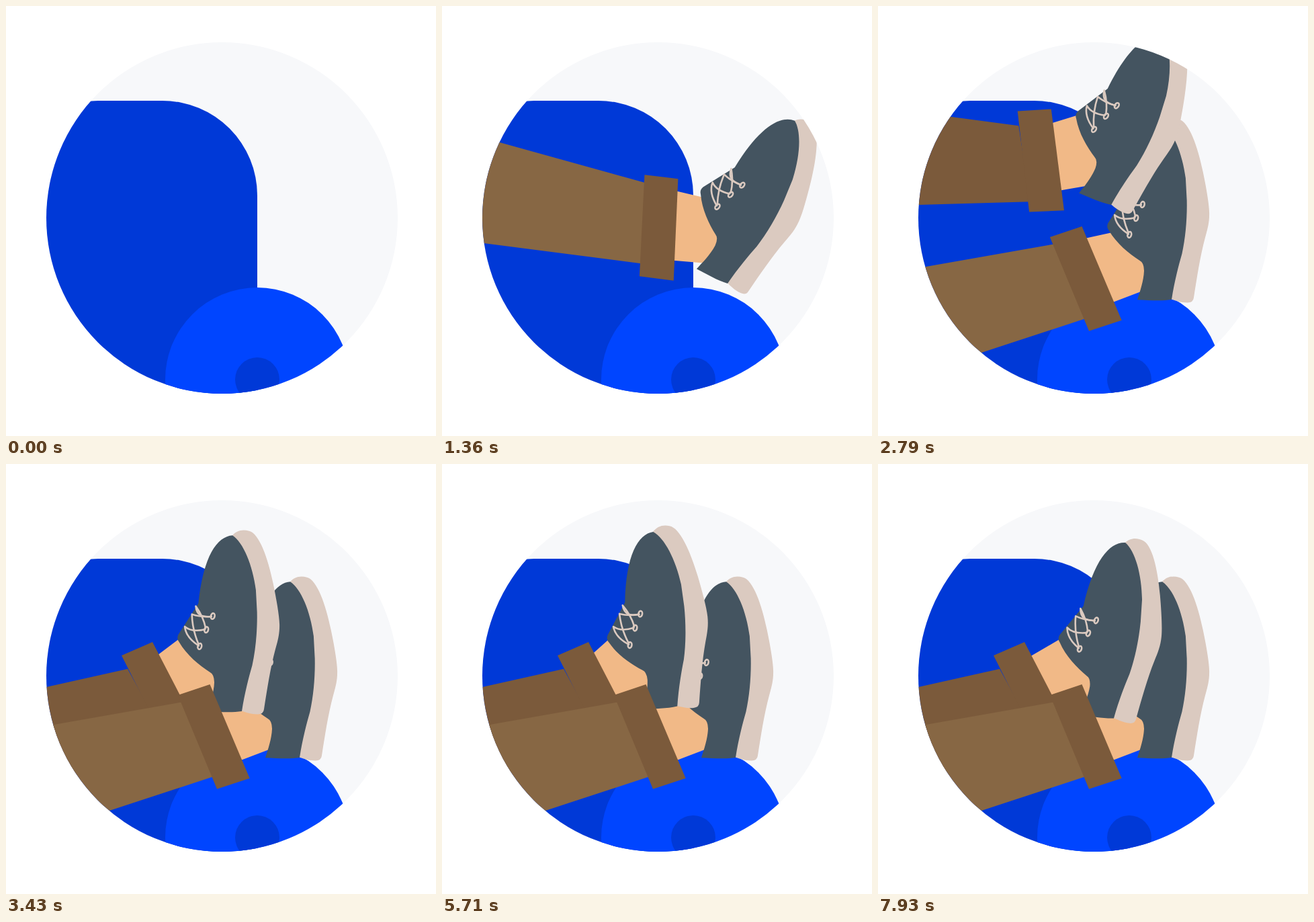
These frames come from a looping animation (640 px wide and 640 px high, 8000 ms). An HTML page:

```html
<!DOCTYPE html>
<html lang="en">
<head>
<meta charset="utf-8">
<title>Feet up</title>
<style>
  html, body { margin: 0; width: 100%; height: 100%; overflow: hidden; background: #fff; }
  svg { display: block; width: 100vw; height: 100vh; }
  .body { fill: #0039d7; }
  .wheel { fill: #0045ff; }
  .leg { fill: #876744; }
  .cuff { fill: #7b5a3b; }
  .skin { fill: #f1b987; }
  .upper { fill: #445460; }
  .sole { fill: #dbcac0; }
  .lace { fill: none; stroke: #dbcac0; stroke-width: 2.6; stroke-linecap: round; stroke-linejoin: round; }
</style>
</head>
<body>
<svg viewBox="0 0 640 640">
  <defs>
    <clipPath id="disc"><circle cx="321.5" cy="315.5" r="261.5"/></clipPath>
    <g id="shoe">
      <path class="sole" d="M428 172C436 162 446 161 455 164C470 168 482 205 489 243C493 265 497 290 497 304C497 318 494 328 490 341C482 368 476 402 471 430Q470 437 462 437C452 437 445 434 436 431L440 300Z"/>
      <path class="upper" d="M430 170C407 171 386 200 377 270L346 316Q343 322 347 327C358 347 376 362 392 373Q398 376 398 388C397 404 391 419 387 431C404 432 422 434 438 432C443 404 450 380 455 364C461 340 464 310 464 285L463 252C459 215 446 181 430 170Z"/>
      <g class="lace">
        <path d="M396 290C382 291 374 288 373 274Q384 290 387 307"/>
        <path d="M396 290Q380 291 367 286Q367 309 376 331"/>
        <path d="M386 309Q366 313 356 304Q357 320 376 333"/>
        <ellipse cx="398" cy="289.5" rx="2.8" ry="4.4" transform="rotate(15 398 289.5)"/>
        <ellipse cx="388" cy="309.5" rx="2.8" ry="4.4" transform="rotate(15 388 309.5)"/>
        <ellipse cx="377.5" cy="334" rx="2.8" ry="4.4" transform="rotate(15 377.5 334)"/>
      </g>
    </g>
  </defs>
  <g clip-path="url(#disc)">
    <path fill="#f7f8fa" d="M0 0H640V640H0Z"/>
    <path class="body" d="M-4 640V282A141 141 0 0 1 137 141H233A141 141 0 0 1 374 282V640Z"/>
    <circle class="wheel" cx="374" cy="556" r="137"/>
    <circle class="body" cx="374" cy="556" r="33"/>

    <g class="front">
      <path class="skin" d="M290 342L352 330L402 376L398 417L353 433L325 443Z"/>
      <use href="#shoe"/>
    </g>
    <g class="back">
      <g id="foot">
        <path class="skin" d="M205 300L258 260L312 312L312 351L280 369.5L235 396Z"/>
        <use href="#shoe" transform="translate(351 368) rotate(-1.3) translate(-438 -432)"/>
      </g>
      <path class="cuff" d="M-300 412L181 305L236 405L-300 620Z"/>
      <path class="cuff" d="M172 285L218 265L288 400L240 420Z"/>
    </g>
    <g class="front">
      <path class="leg" d="M-300 431.5L268 345L312 456.5L-300 641.5Z"/>
      <path class="cuff" d="M259 335L307 320L363 461L314 476Z"/>
    </g>
  </g>
</svg>
<script>
const LOOP = 8000;

// Poses: time, x and y of the heel corner, turn in degrees
const frontPoses = [
  [360, -130, 730, 50], [800, 205, 565, 41], [1210, 402, 441, 29], [1360, 425, 413, 24.2],
  [1750, 433, 418, 10.5], [2140, 438, 432, 0], [2320, 437, 437, -1.3]
];
const backPoses = [
  [1540, -110, 270, 49], [2140, 157, 221, 38.3], [2560, 300, 258, 28],
  [2930, 364, 320, 15], [3200, 360, 357, 4.5], [3430, 351, 368, 0]
];
const wiggle = [[4800, 0], [6145, -6.4], [6745, 6.8], [7345, -6.6], [7945, 6.8]];

// Smooth curve through timed keys; "flat" rests at every key
function sample(keys, t, flat) {
  const last = keys.length - 1;
  if (t <= keys[0][0]) return keys[0].slice(1);
  if (t >= keys[last][0]) return keys[last].slice(1);
  const i = keys.findIndex(k => k[0] > t) - 1;
  const a = keys[i], b = keys[i + 1];
  const span = b[0] - a[0], u = (t - a[0]) / span, v = 1 - u;
  const slope = (j, c) => flat || j === 0 || j === last ? 0
    : (keys[j + 1][c] - keys[j - 1][c]) / (keys[j + 1][0] - keys[j - 1][0]) * span;
  return a.slice(1).map((_, n) => {
    const c = n + 1;
    return v * v * (1 + 2 * u) * a[c] + u * v * v * slope(i, c)
      + u * u * (1 + 2 * v) * b[c] - u * u * v * slope(i + 1, c);
  });
}

function place(selector, [x, y, turn], ox, oy, shown) {
  document.querySelectorAll(selector).forEach(part => {
    part.setAttribute('transform', `translate(${x} ${y}) rotate(${turn}) translate(${-ox} ${-oy})`);
    part.setAttribute('visibility', shown ? 'visible' : 'hidden');
  });
}

function draw(t) {
  place('.front', sample(frontPoses, t), 438, 432, t >= 430);
  place('.back', sample(backPoses, t), 351, 368, t >= 1540);
  const [turn] = sample(wiggle, t, true);
  document.getElementById('foot').setAttribute('transform', `rotate(${turn} 262 373)`);
}

const start = performance.now();
function tick() {
  draw((performance.now() - start) % LOOP);
  requestAnimationFrame(tick);
}
tick();
</script>
</body>
</html>
```
